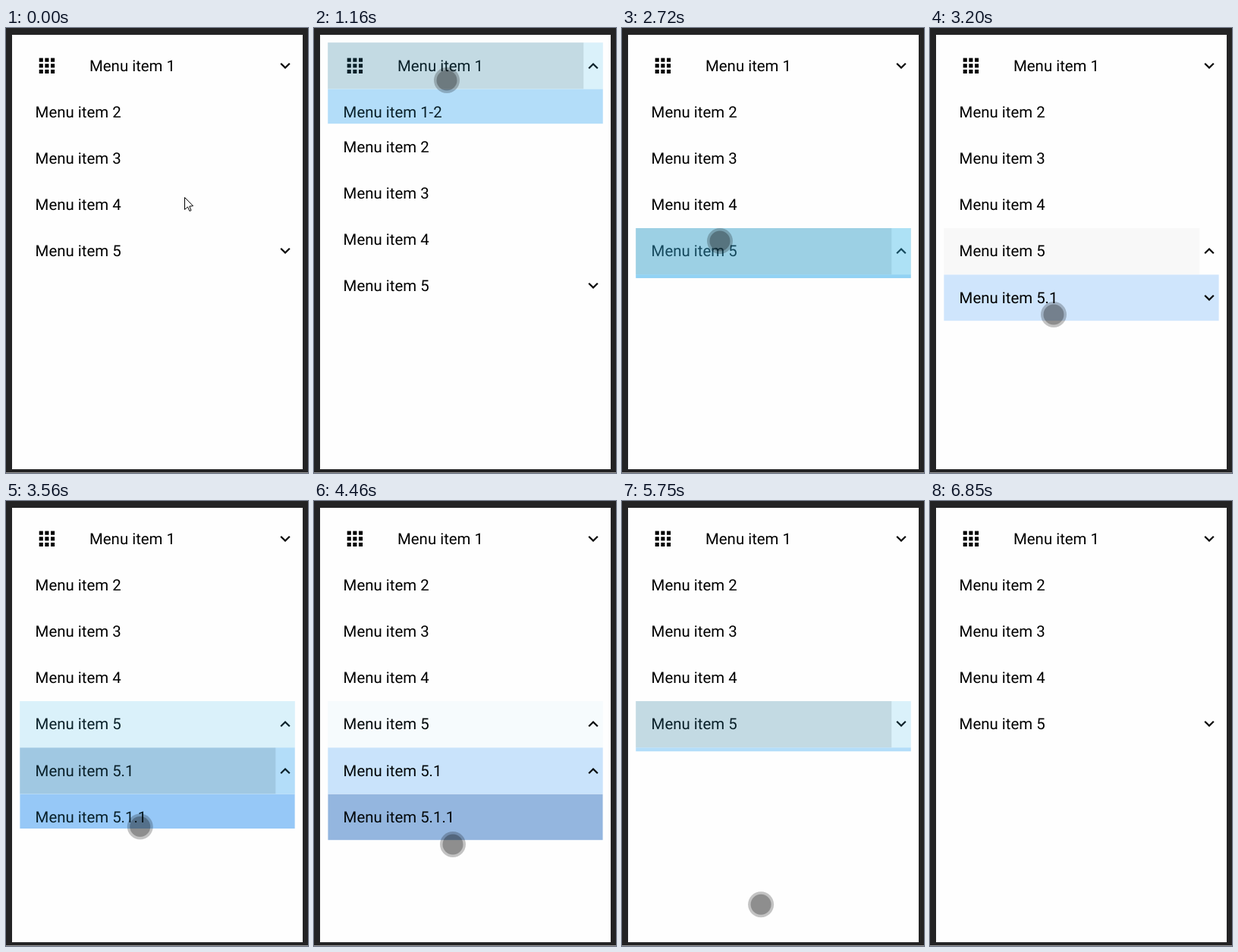
These frames come from a looping animation (398x587 px, 6.89 s). An HTML page with a canvas:

```html
<!DOCTYPE html>
<html lang="en">
<head>
<meta charset="utf-8">
<title>Expanding menu</title>
<style>
html, body { margin: 0; width: 100%; height: 100%; overflow: hidden; background: #232324; }
canvas { display: block; }
</style>
</head>
<body>
<canvas id="stage" width="398" height="587"></canvas>
<script>
const ctx = document.getElementById('stage').getContext('2d');
const LOOP = 6890, STEP = 58, GLIDE = 560;
const SCALE = 1.275, ROW = 48 * SCALE, PAD = 16 * SCALE;
const LEFT = 18.2, WIDTH = 362.6, TOP = 19.2, BUTTON = 20 * SCALE;

// The picture moves only inside a scene. Each one may press a row and send the pointer to x, y.
const SCENES = [
  { start: 340, end: 830, x: 175, y: 69 },
  { start: 1040, end: 1500, press: '1' },
  { start: 1870, end: 2510, press: '1', x: 129, y: 281, wait: 120 },
  { start: 2720, end: 3260, press: '5', x: 163, y: 378 },
  { start: 3440, end: 4000, press: '5.1', x: 183, y: 453 },
  { start: 4340, end: 4940, press: '5.1.1', x: 170, y: 348, wait: 120, lead: 50 },
  { start: 5140, end: 5380, press: '5.1', x: 168, y: 296 },
  { start: 5630, end: 5960, press: '5', x: 190, y: 640 },
  { start: 6850, end: 6850, press: 'none' }
];
const PRESSES = SCENES.filter(s => s.press)
  .map(({ press, start, lead = 0 }) => ({ id: press, time: start - lead }));
const PARENTS = ['1', '5', '5.1'];

const clamp = v => Math.max(0, Math.min(1, v));
const lastPress = (t, test) => PRESSES.filter(p => p.time <= t && test(p.id)).pop();

function snap(t) {
  const scene = SCENES.filter(s => s.start <= t).pop();
  if (!scene) return 0;
  const { start, end } = scene;
  return Math.min(start + Math.floor((t - start) / STEP) * STEP, end);
}

// CSS "ease": cubic-bezier(.25, .1, .25, 1)
function ease(x) {
  x = clamp(x);
  let lo = 0, hi = 1;
  for (let i = 0; i < 20; i++) {
    const s = (lo + hi) / 2, r = 1 - s;
    if (0.75 * s * r * r + 0.75 * s * s * r + s ** 3 < x) lo = s; else hi = s;
  }
  return 0.3 * lo * (1 - lo) ** 2 + 3 * lo * lo * (1 - lo) + lo ** 3;
}

const isOpen = (id, t) => PRESSES.filter(p => p.id === id && p.time <= t).length % 2 === 1;

function openness(id, t) {
  const press = lastPress(t, other => other === id);
  if (!press) return 0;
  const age = t - press.time + 28;
  return isOpen(id, t) ? ease(age / 320) : 1 - ease(age / 220);
}

function tapAlpha(id, t) {
  const press = lastPress(t, other => other.startsWith(id));
  return press ? 0.4 * clamp(1 - (t - press.time - 30) / 150) : 0;
}

function rippleAlpha(id, t) {
  const press = lastPress(t, () => true);
  if (!press || press.id !== id) return 0;
  return 0.11 - 0.09 * clamp((t - press.time - 170) / 300);
}

function rect(color, x, y, w, h) {
  ctx.fillStyle = color;
  ctx.fillRect(x, y, w, h);
}

function chevron(y, up) {
  const d = up ? -3.3 : 3.3;
  ctx.strokeStyle = '#000';
  ctx.lineWidth = 2.2;
  ctx.beginPath();
  ctx.moveTo(362.2, y - d);
  ctx.lineTo(368, y + d * 0.76);
  ctx.lineTo(373.8, y - d);
  ctx.stroke();
}

function row(t, id, y, color = 'transparent', indent = 0) {
  const parent = PARENTS.includes(id);
  rect(color, LEFT, y, WIDTH, ROW);
  ctx.fillStyle = '#000';
  ctx.fillText('Menu item ' + id, LEFT + PAD + indent, Math.floor(y + 37.9));
  if (parent) chevron(Math.floor(y + 30.9), isOpen(id, t));
  rect(`rgba(0,0,0,${rippleAlpha(id, t)})`, LEFT, y, WIDTH - (parent ? BUTTON : 0), ROW);
}

function gridIcon() {
  const size = 4 * SCALE, pitch = 6 * SCALE;
  for (let i = 0; i < 9; i++) {
    rect('#000', 43.7 + i % 3 * pitch, 39.6 + Math.floor(i / 3) * pitch, size, size);
  }
}

function clipped(y, height, draw) {
  ctx.save();
  ctx.beginPath();
  ctx.rect(LEFT, y, WIDTH, height);
  ctx.clip();
  draw();
  ctx.restore();
}

function tapTint(id, t, y, height) {
  rect(`rgba(51,181,229,${tapAlpha(id, t)})`, LEFT, y, WIDTH, height);
}

function menu(t) {
  const h1 = ROW * openness('1', t);
  row(t, '1', TOP, 'transparent', 56 * SCALE);
  gridIcon();
  clipped(TOP + ROW, h1, () => row(t, '1-2', TOP + ROW, '#cfe5fc'));
  tapTint('1', t, TOP, ROW + h1);

  for (let i = 1; i < 4; i++) row(t, String(i + 1), TOP + i * ROW + h1);

  const y5 = TOP + 4 * ROW + h1, sub = y5 + ROW;
  const inner = ROW * openness('5.1', t);
  const h5 = (ROW + inner) * openness('5', t);
  row(t, '5', y5);
  clipped(sub, h5, () => {
    row(t, '5.1', sub, '#cfe5fc');
    clipped(sub + ROW, inner, () => row(t, '5.1.1', sub + ROW, '#abccfa'));
  });
  tapTint('5', t, y5, ROW + h5);
}

function disc(x, y, r, color) {
  ctx.fillStyle = color;
  ctx.beginPath();
  ctx.arc(x, y, r, 0, 7);
  ctx.fill();
}

function arrow(x, y) {
  ctx.fillStyle = '#fff';
  ctx.strokeStyle = '#000';
  ctx.lineWidth = 1;
  const shape = new Path2D('M.5 .5v16l4-3.5 2.5 5.5 2-1-2.2-5.3 4.7-.5z');
  ctx.save();
  ctx.translate(x, y);
  ctx.fill(shape);
  ctx.stroke(shape);
  ctx.restore();
}

function pointer(t) {
  let x = 235, y = 223;
  if (t <= SCENES[0].start) return arrow(x, y);
  for (const s of SCENES.filter(s => s.x)) {
    const k = 1 - (1 - clamp((t - s.start - (s.wait || 0)) / GLIDE)) ** 5;
    x += (s.x - x) * k;
    y += (s.y - y) * k;
  }
  disc(x, y, 17, 'rgba(0,0,0,.23)');
  disc(x, y, 13.5, 'rgba(0,0,0,.27)');
}

function frame() {
  const t = snap(performance.now() % LOOP);
  rect('#232324', 0, 0, 398, 587);
  rect('#999', 0, 586, 398, 1);
  rect('#fefefe', 8, 9, 383, 573);
  ctx.font = `${16 * SCALE}px Roboto, sans-serif`;
  ctx.textRendering = 'geometricPrecision';
  menu(t);
  pointer(t);
  requestAnimationFrame(frame);
}
frame();
</script>
</body>
</html>
```
